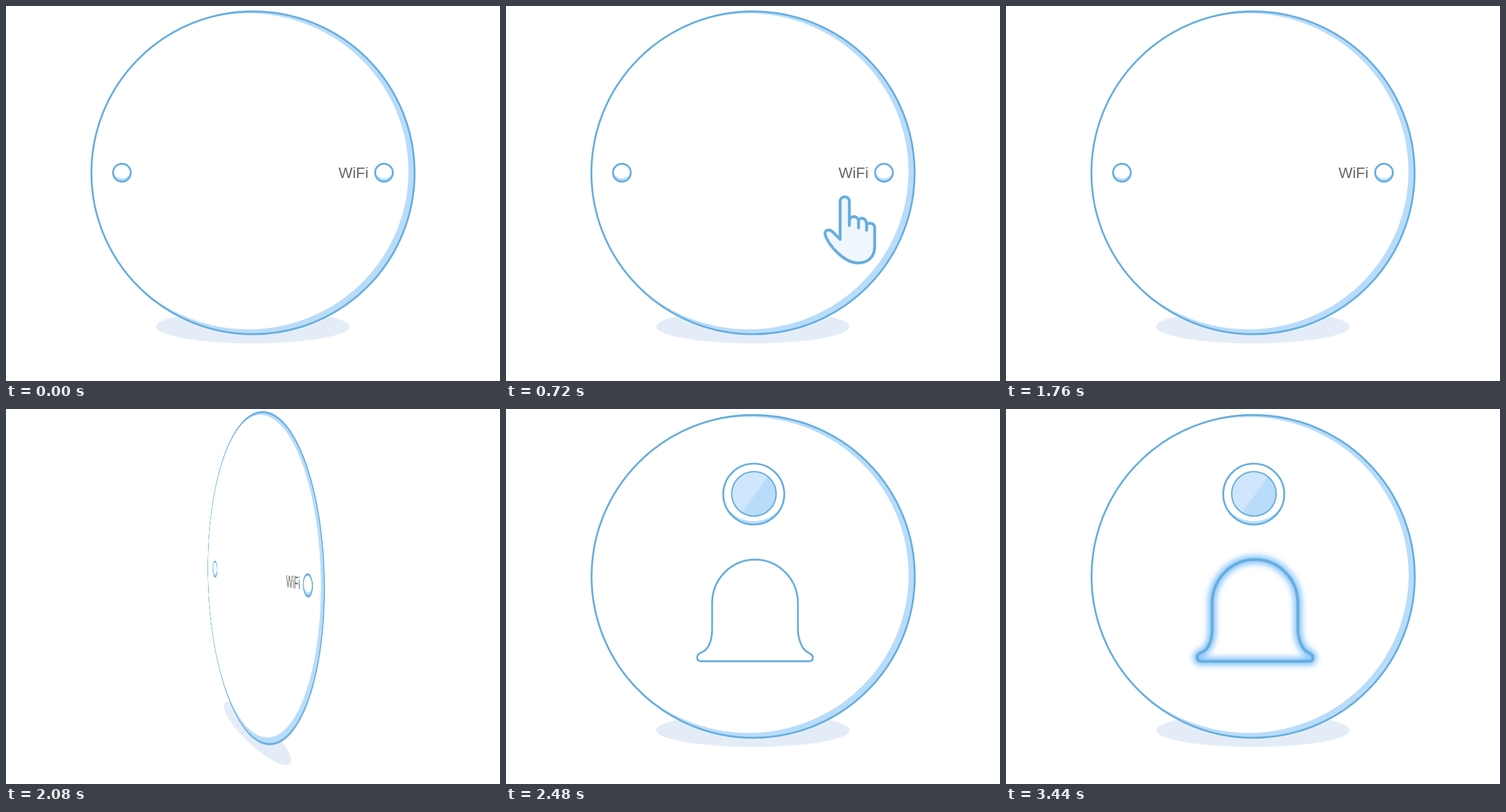
These frames come from a looping animation (858 by 652 pixels, 5.48 s). An HTML page:

```html
<!DOCTYPE html>
<html lang="en">
<head>
<meta charset="utf-8">
<title>Doorbell setup</title>
<style>
  html, body { margin: 0; width: 100%; height: 100%; overflow: hidden; background: #fff; }
  #stage { position: relative; width: 858px; height: 652px; overflow: hidden; }
  svg { position: absolute; left: 0; top: 0; transform-origin: 429px 215px; }
  .line { fill: none; stroke: #66aede; stroke-width: 3.2; }
  .tint { fill: #b9dcfb; }
  .white { fill: #fff; }
  .shade { fill: #e4edf7; }
  .red { fill: #ff6060; }
  text { font: 26px "Liberation Sans", Arial, sans-serif; fill: #666; }
  #hand path { stroke: #66aede; stroke-width: 5; stroke-linejoin: round; stroke-linecap: round; }
</style>
</head>
<body>
<div id="stage">
  <!-- Shared shapes, kept apart so that hiding a face leaves the clips intact -->
  <svg width="0" height="0">
    <defs>
      <clipPath id="discClip"><circle cx="429" cy="290" r="280.5"/></clipPath>
      <clipPath id="knobClip"><circle r="15.5"/></clipPath>
      <clipPath id="lensClip"><circle cx="430.3" cy="148" r="53"/></clipPath>
      <clipPath id="glassClip"><circle cx="430.6" cy="147.5" r="38.5"/></clipPath>
      <filter id="blur" filterUnits="userSpaceOnUse" x="280" y="210" width="310" height="280">
        <feGaussianBlur stdDeviation="5"/>
      </filter>
      <g id="disc">
        <ellipse class="shade" cx="428.7" cy="557.5" rx="168" ry="29"/>
        <circle class="white" cx="429" cy="290" r="280.5"/>
        <g clip-path="url(#discClip)">
          <circle class="tint" cx="429" cy="290" r="280.5"/>
          <ellipse class="white" cx="421" cy="287.5" rx="278" ry="274.7"/>
        </g>
        <circle class="line" cx="429" cy="290" r="280.7"/>
      </g>
      <g id="knob">
        <g clip-path="url(#knobClip)">
          <circle class="tint" r="15.5"/>
          <circle class="white" cy="-5" r="15.2"/>
        </g>
        <circle class="line" r="15.5"/>
      </g>
      <path id="bell" d="M358 338C358 296 391 261.8 432.5 261.8S507 296 507 338V382C507 400 514 415 520 420C526 425 533 426 533 432C533 437 530 438.7 526 438.7H339C334 438.7 332 436 332 432C332 427 335 425 341 422.5C352 418 358 402 358 382Z"/>
    </defs>
  </svg>

  <svg id="front" width="858" height="652" viewBox="0 0 858 652">
    <use href="#disc"/>
    <use href="#knob" x="201.3" y="289.8"/>
    <use href="#knob" x="656.5" y="289.8"/>
    <text x="577.5" y="298.5">WiFi</text>
    <g id="pulse">
      <circle id="ring" class="red" cx="655.5" cy="289.5" r="30" opacity=".3"/>
      <circle class="red" cx="656.5" cy="289.8" r="17" opacity=".44"/>
    </g>
    <g id="hand">
      <path fill="#eff6fe" d="M509 450V384A8 8 0 0 1 525 384V418C526 408 540 408 541 418C542 411 555 411 555 425C557 420 569 421 569 430V462C569 480 558 491 540 491C515 491 489 460 483 442C481 434 490 431 496 437Z"/>
      <path fill="none" d="M525 416V426M541 416V430M555 422V434"/>
    </g>
  </svg>

  <svg id="back" width="858" height="652" viewBox="0 0 858 652">
    <use href="#disc" x=".3" y="1"/>
    <g clip-path="url(#lensClip)">
      <circle class="tint" cx="430.3" cy="148" r="53"/>
      <ellipse class="white" cx="430.3" cy="143" rx="56" ry="52"/>
    </g>
    <circle class="line" cx="430.3" cy="148" r="53"/>
    <g clip-path="url(#glassClip)">
      <circle class="tint" cx="430.6" cy="147.5" r="38.5"/>
      <path fill="#cfe6fc" d="M455 117L410 180L380 180V100H467Z"/>
    </g>
    <circle class="line" style="stroke-width:2.4" cx="430.6" cy="147.5" r="38.6"/>
    <use class="line" href="#bell"/>
    <g id="glow">
      <use href="#bell" fill="none" stroke="#8fc8fb" stroke-width="15" filter="url(#blur)"/>
      <use class="line" style="stroke-width:5" href="#bell"/>
    </g>
  </svg>
</div>
<script>
const LOOP = 5480, STEP = 80;
const $ = id => document.getElementById(id);
const front = $('front'), back = $('back'), hand = $('hand');
const pulse = $('pulse'), ring = $('ring'), glow = $('glow');

// Rows of [ms, value], linear between rows
const handX = [[80, -76], [400, 0], [560, 37], [1040, 140]];
const handY = [[80, 43], [400, 0], [560, -23], [1040, -87]];
const handAlpha = [[0, 0], [320, 1], [1440, 1], [1760, 0]];
const ringSize = [[960, 17], [1120, 30], [1200, 33], [1440, 19], [1680, 17]];
const pulseAlpha = [[960, 0], [1120, 1], [1440, 1], [1760, 0]];
const frontTurn = [[1920, 0], [2000, -35], [2080, -70], [2160, -90]];
const backTurn = [[2240, 90], [2320, 39.7], [2400, 20], [2480, 0]];
const glowAlpha = [[2960, 0], [3440, 1]];

function at(rows, t) {
  if (t <= rows[0][0]) return rows[0][1];
  for (let i = 1; i < rows.length; i++) {
    const [t0, v0] = rows[i - 1], [t1, v1] = rows[i];
    if (t <= t1) return v0 + (v1 - v0) * (t - t0) / (t1 - t0);
  }
  return rows[rows.length - 1][1];
}

function turn(face, angle) {
  face.style.visibility = Math.abs(angle) < 89 ? 'visible' : 'hidden';
  face.style.transform = angle ? `perspective(1170px) rotateY(${angle}deg)` : 'none';
}

function draw(ms) {
  const t = Math.floor((ms % LOOP) / STEP) * STEP;
  hand.setAttribute('transform', `translate(${at(handX, t)} ${at(handY, t)})`);
  hand.setAttribute('opacity', at(handAlpha, t));
  ring.setAttribute('r', at(ringSize, t));
  pulse.setAttribute('opacity', at(pulseAlpha, t));
  turn(front, at(frontTurn, t));
  turn(back, at(backTurn, t));
  glow.setAttribute('opacity', at(glowAlpha, t));
}

const start = performance.now();
function tick() {
  draw(performance.now() - start);
  requestAnimationFrame(tick);
}
tick();
</script>
</body>
</html>
```
